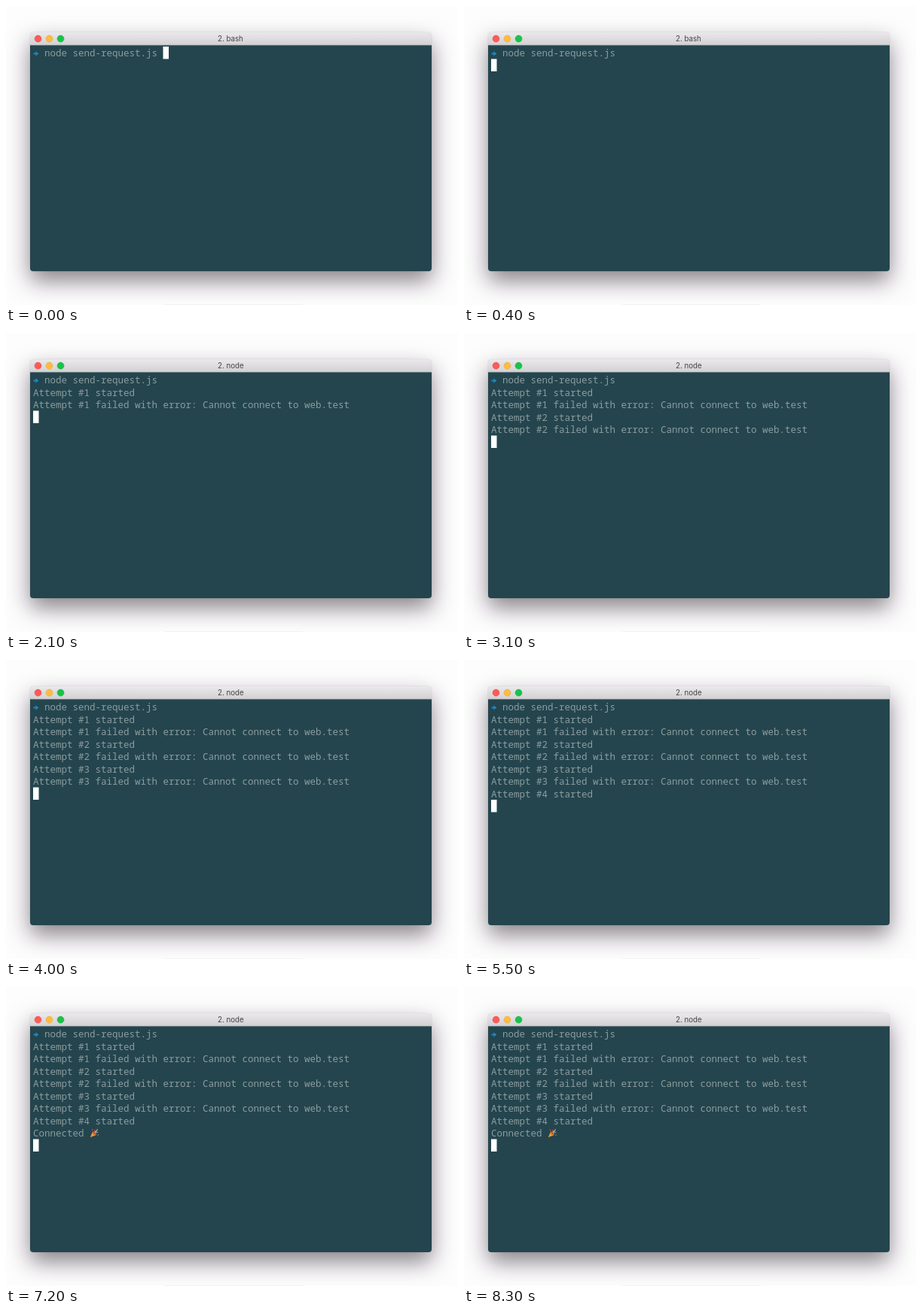
An HTML page that plays this animation: 600 px wide and 398 px high, repeating every 8400 ms.

```html
<!DOCTYPE html>
<html lang="en">
<head>
<meta charset="utf-8">
<title>Terminal retry</title>
<style>
  html, body { margin: 0; width: 100%; height: 100%; overflow: hidden; background: #fefdfe; }
  .shadow {
    position: absolute; left: 32px; top: 35px; width: 533px; height: 318px;
    border-radius: 5px 5px 4px 4px;
    box-shadow: 0 13px 30px rgba(20, 10, 20, .5), 0 0 1px rgba(0, 0, 0, .4);
  }
  svg { position: absolute; left: 0; top: 0; display: block; }
  .term { font: 500 12.5px "Noto Sans Mono", "DejaVu Sans Mono", monospace; fill: #8b9c9e; white-space: pre; }
  .title { font: 400 9.7px Inter, Roboto, sans-serif; fill: #454345; }
</style>
</head>
<body>
<div class="shadow"></div>
<svg width="600" height="398" viewBox="0 0 600 398">
  <defs>
    <linearGradient id="bar" x2="0" y2="1">
      <stop offset="0" stop-color="#ebe9eb"/>
      <stop offset="1" stop-color="#d2d0d2"/>
    </linearGradient>
  </defs>
  <rect x="210" y="397" width="184" height="1" rx=".5" fill="#f3f2f3"/>
  <rect x="32" y="45" width="533" height="308" rx="4" fill="#24454e"/>
  <path d="M32 52V40a5 5 0 0 1 5-5H560a5 5 0 0 1 5 5V52Z" fill="url(#bar)"/>
  <path d="M32 52H565" stroke="#b3b4b5" stroke-width=".7"/>
  <g stroke-width=".5">
    <circle cx="42.5" cy="43.6" r="4.5" fill="#fc5b57" stroke="#df4744"/>
    <circle cx="57.5" cy="43.6" r="4.5" fill="#fdbc40" stroke="#de9f34"/>
    <circle cx="72.5" cy="43.6" r="4.5" fill="#18c34b" stroke="#14a83c"/>
  </g>
  <text id="title" class="title" x="281" y="47"></text>
  <path d="M36.5 63.4H40" stroke="#1f87c4" stroke-width="2"/>
  <path d="M39 60L43.4 63.4L39 66.8L39.8 63.4Z" fill="#1f87c4"/>
  <g id="lines" class="term"></g>
  <g id="popper" transform="translate(111 188.5)">
    <path d="M.8 11.6L4.2 3.8Q7.7 5.2 8.8 8.4Z" fill="#f2b338"/>
    <path d="M2 8.9L4 10.3M3.2 6.2L6.5 9.2" stroke="#e2683c" stroke-width="1.1"/>
    <ellipse cx="6.5" cy="6.1" rx="3.1" ry="1.2" transform="rotate(45 6.5 6.1)" fill="#a8522e"/>
    <path d="M6.2 5.6Q7.8 3.8 6.8 1.6" fill="none" stroke="#e8536a" stroke-width="1.2"/>
    <path d="M7.4 6.6Q9 4.6 11.4 4.8" fill="none" stroke="#62a8dc" stroke-width="1.1"/>
    <path d="M7.2 5.2L10 2.2" stroke="#f6d365" stroke-width="1.1"/>
    <g fill="#e96450">
      <circle cx="3.5" cy="1.8" r=".8"/>
      <circle cx="11" cy="8.6" r=".8"/>
      <circle cx="10.2" cy="1.2" r=".7" fill="#f2b338"/>
    </g>
  </g>
  <rect id="cursor" width="7.5" height="16.5" fill="#fff"/>
</svg>
<script>
  const LOOP = 8400, LEFT = 36, TOP = 54, CELL = 7.5, ROW = 16.5;
  const byId = id => document.getElementById(id);

  const started = n => `Attempt #${n} started`;
  const failed = n => `Attempt #${n} failed with error: Cannot connect to web.test`;
  const output = [
    'node send-request.js',
    ...[1, 2, 3].flatMap(n => [started(n), failed(n)]),
    started(4),
    'Connected'
  ];

  // time in ms, visible lines, cursor column, running process
  const steps = [
    [0, 1, 23, 'bash'],
    [400, 1, 0, 'bash'],
    [1000, 3, 0, 'bash'],
    [1500, 3, 0, 'node'],
    [2500, 5, 0, 'node'],
    [4000, 7, 0, 'node'],
    [5500, 8, 0, 'node'],
    [6000, 9, 0, 'node']
  ];

  const rows = output.map((text, i) => {
    const el = document.createElementNS('http://www.w3.org/2000/svg', 'text');
    el.setAttribute('x', i ? LEFT : LEFT + 2 * CELL);
    el.setAttribute('y', TOP + 13 + i * ROW);
    el.textContent = text;
    return byId('lines').appendChild(el);
  });

  const show = (el, on) => el.setAttribute('visibility', on ? 'visible' : 'hidden');
  let current;

  function render(now) {
    const time = now % LOOP;
    const step = steps.findLast(([start]) => start <= time);
    if (step !== current) {
      current = step;
      const [, count, column, process] = step;
      rows.forEach((el, i) => show(el, i < count));
      show(byId('popper'), count === output.length);
      byId('title').textContent = `2. ${process}`;
      const cursorRow = column ? 0 : count;
      byId('cursor').setAttribute('x', LEFT + column * CELL);
      byId('cursor').setAttribute('y', TOP + cursorRow * ROW);
    }
  }

  const origin = performance.now();
  function tick() {
    render(performance.now() - origin);
    requestAnimationFrame(tick);
  }
  tick();
</script>
</body>
</html>
```
